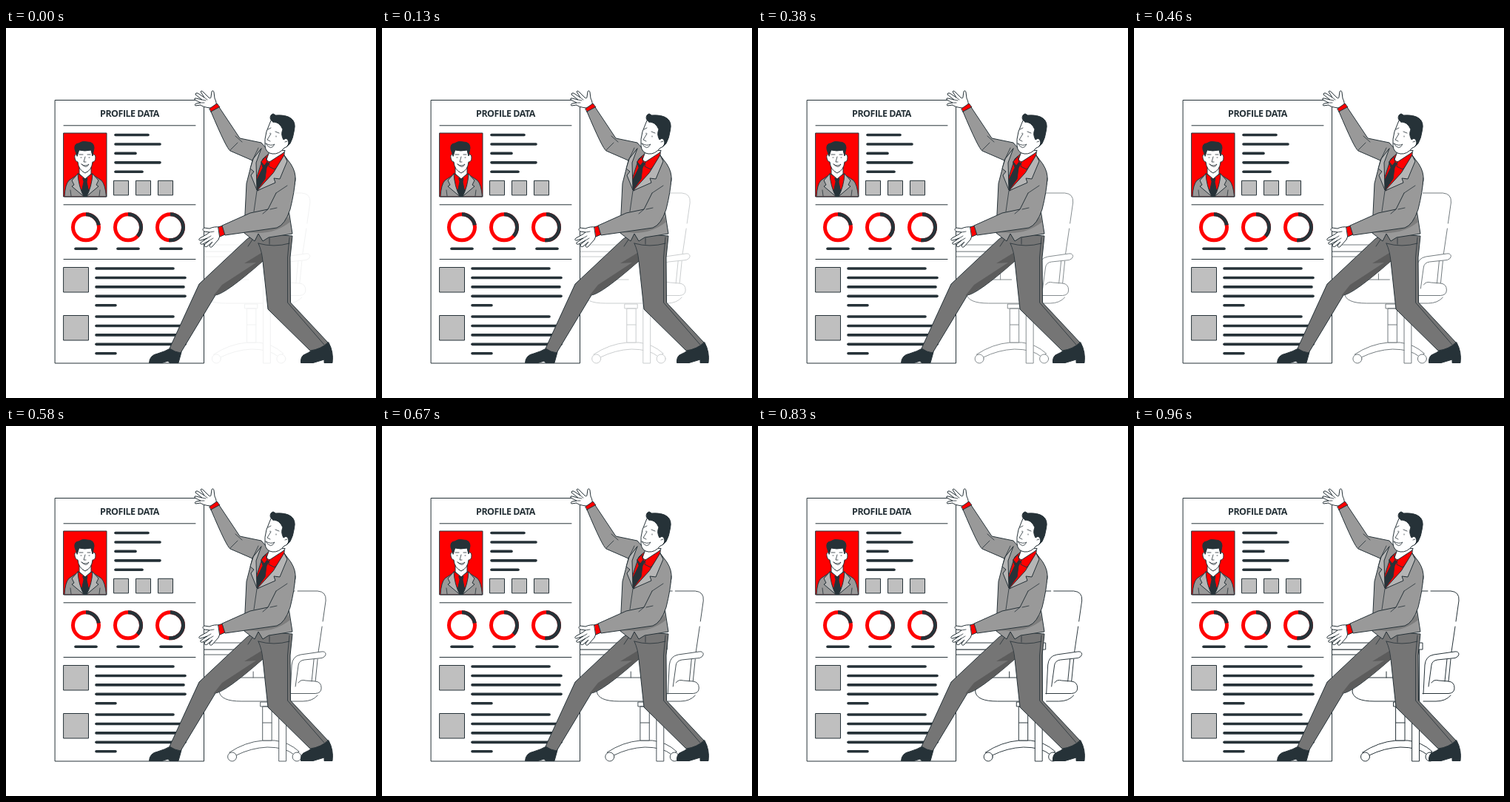
These frames come from a looping animation (500 by 500 pixels, 1.04 s). An HTML page:

```html
<!DOCTYPE html>
<html lang="en">
<head>
<meta charset="utf-8">
<title>Profile data</title>
<style>
html, body { margin: 0; width: 100%; height: 100%; overflow: hidden; background: #fff; }
svg { display: block; width: 100%; height: 100%; stroke-linecap: round; stroke-linejoin: round; }
.ink { fill: none; stroke: #263238; stroke-width: 1; }
.thin { stroke-width: .8; }
.white { fill: #fff; }
.red { fill: #f00; }
.dark { fill: #263238; }
.jacket { fill: #999; }
.lapel { fill: #b5b5b5; }
.legs { fill: #757575; }
.shade { fill: #5c5c5c; stroke: none; }
.tile { fill: #bfbfbf; }
#bars { stroke: #263238; stroke-width: 3.6; }
#rings { fill: none; stroke-width: 5; stroke-linecap: butt; }
#title { font: 700 15px "Open Sans", Roboto, sans-serif; font-stretch: 75%; font-variation-settings: "wdth" 75; letter-spacing: -.04em; text-anchor: middle; fill: #263238; }
</style>
</head>
<body>
<svg viewBox="0 0 500 500">
  <g id="office" class="ink">
    <!-- chair back, armrest and seat -->
    <path d="M380 223H397M401 223H428Q440 224 439 236L435 264M434 271L429 305"/>
    <path class="white" d="M391 362L393 323Q394 311 405 309L433 305Q438.500 304 439 308.500Q438.500 312 434 313.500L410 316Q403 317 402 323L398 352"/>
    <path d="M428 315L425 345M423 315L420 345M402 347Q405 342 412 344L425 345Q433 346 433 354Q433 361 425 361.500H390M391 372H408Q421 372 428 364"/>
    <path d="M312 340H356M341 332V340M305 342Q295 350 295 359Q297 372 325 372H378"/>
    <!-- base and casters -->
    <path class="white" d="M309 441Q330 427 354 425H370Q389 427 403 440L396 444Q384 434 360 434Q338 435 318 445Z"/>
    <path class="white" d="M351 373H368V379H351ZM354 379H366V425H354Z"/>
    <path d="M354 401H366"/>
    <circle class="white" cx="312.500" cy="447" r="6"/>
    <circle class="white" cx="400" cy="447" r="6"/>
    <!-- desk -->
    <path class="white" d="M240 302H376V309H240Z"/>
    <path class="white" d="M376 302H385.500V453H376Z"/>
    <path class="white" d="M240 293H390V302H240Z"/>
  </g>

  <g id="panel" class="ink">
    <path class="white" d="M66.500 97.500H267.500V453H66.500Z"/>
    <path d="M78 131.800H256M78 238.800H256M78 312.500H256"/>
    <g id="tiles"></g>
    <path class="red" d="M78 142H136V228H78Z"/>
    <path class="jacket" d="M79 227.500Q80 211 85 206L97 198H117L129 206Q134 211 135.500 227.500Z"/>
    <path class="red" d="M98 197L107 203L116 197L119 204L109 227.500H105L95 204Z"/>
    <path class="dark" d="M104 203H110L109 208L112 222L109 227.500H105L102 222L105 208Z"/>
    <path class="white" d="M99 187V197L107 204L115 197V187Z"/>
    <path class="lapel" d="M97 197L89 206L92 212L89 214L105 227.500Q98 214 97 197ZM117 197L125 206L122 212L125 214L109 227.500Q116 214 117 197Z"/>
    <path class="thin" d="M87 219L88 227M127 219L126 227"/>
    <path class="white" d="M96 171Q92 170 93 176Q94 181 97 181Q98 192 107 196Q116 192 117 181Q121 181 121 175Q121 170 117 171L115 163H98Z"/>
    <path class="dark" d="M96 173L93 164Q92 156 98 156Q103 152 110 154Q119 154 119 162L117 173L115 165Q106 167 99 165Z"/>
    <path class="thin" d="M99 171H104M110 171H114M101 175H102M112 175H113M107 174L105 181H108M102 184Q107 188 112 184Q109 191 102 184"/>
  </g>
  <text id="title" x="167" y="120.300">PROFILE DATA</text>
  <g id="bars"></g>
  <g id="rings"></g>

  <g id="man" class="ink">
    <!-- legs and shoes -->
    <path class="dark" d="M222 433Q215 437 205 440Q194 442 193.500 452.500H211L219 450L221 452.500H233L237 438Z"/>
    <path class="dark" d="M414 435Q409 439 402 442Q398 445 398.500 452.500H415L430 448V452.500H441Q443 438 436 425Z"/>
    <path class="legs" d="M326 285L261 346L221 433Q228 438 236 439L283 361Q297 359 347 315L354 380L411 436Q426 434 435 425L384.500 371L384 310L387 281L341 277Z"/>
    <path class="shade" d="M345 304L322 318L338 317L292 347L280 362Q302 355 347 315Z"/>
    <path class="thin" d="M383 283L380.500 310V371L430 428M341 291Q346 302 347 315M341 291Q362 297 383 291M333 286L327 295M356 284V292"/>

    <!-- raised hand -->
    <path class="white" d="M276 108Q266 107 263 104L256 105Q254 103 257 102L263 101L255 97Q254 94 257 95L265 97L256 90Q256 87 259 88L268 94L263 86Q264 84 266 86L274 94Q277 96 277 93L278 86Q280 83 281 87L282 95Q285 101 284 104Z"/>
    <path class="thin" d="M263 101L268 101M265 97L270 98M268 94L272 97"/>
    <path class="red" d="M275 109L285 102L289 107L278 114Z"/>

    <!-- lower hand -->
    <path class="white" d="M289 269Q281 268 275 271L268 270Q264 272 268 275L275 276L271 279L262 284Q259 287 263 287L272 284L263 290Q262 293 266 292L275 287L268 293Q268 297 272 295L279 289L275 294Q276 298 279 295L287 286L289 281Z"/>
    <path class="thin" d="M275 276L281 275M272 284L277 281M275 287L280 284"/>
    <path class="red" d="M287 269L293 267L296 279L289 282Z"/>

    <!-- jacket -->
    <path class="jacket" d="M277 113L288 107L316 149L345 155L357 169L376 172L385 184Q392 195 391 206L382 246L387 278L355 283L347 288L341 278L336 288L322 277L323 251L325 210L333 179L303 166Q298 163 277 113Z"/>
    <path class="shade" style="fill:#7d7d7d" d="M324 276L366 270L382 255L384 262Q365 277 341 277Z"/>
    <path class="red" d="M347 177L356 169L376 172L379 178Q360 210 340 220L337 208Z"/>
    <path class="dark" d="M345 181L350 179L355 183L352 189L350 204L340 218L338 207L347 189Z"/>
    <path class="white" d="M357 164L352 178Q357 184 367 180L377 166Z"/>
    <path class="red" d="M351 174L353 181L349 186L345 181ZM376 168L356 181L355 187L363 191L375 178Z"/>
    <path class="lapel" d="M345 163L338 182L339 219L331 199L335 194L330 190L334 177ZM376 172L380 180L370 204L362 203L364 209L339 220L361 196Z"/>
    <path class="jacket" d="M391 203Q390 221 384 245Q377 266 366 270L296 280L292 267L330 250L354 245L365 223"/>
    <path class="thin" d="M365 223L380 213M357 245L366 243M354 245L347 251M339 220L335 248M310 146L319 154M303 165L313 155M333 179L341 162"/>

    <!-- head -->
    <path class="white" d="M358 125L352 140Q349 151 350 159Q351 169 360 170Q369 171 376 162Q383 160 382 153Q380 147 376 150L375 132Z"/>
    <path class="dark" d="M361 127Q355 123 358 118Q361 114 364 118Q378 117 385 122Q392 127 389.500 138Q388 149 384 156L379 161L380 160Q384 154 380 150Q378 148 375 151Q371 144 374 137Q369 126 361 127Z"/>
    <path class="thin" d="M354 137L358 135M364 140L369 142M357 142V143M365 146V147M358 143L353 151L357 153M351 156Q358 160 363 157Q358 167 351 156M377 154L380 153"/>
  </g>
</svg>
<script>
const $ = id => document.getElementById(id);
const square = (x, y, s) => `<rect class="tile" x="${x}" y="${y}" width="${s}" height="${s}"/>`;
const bar = (x, y, end) => `<path d="M${x} ${y}H${end}"/>`;
const stack = (x, y, ends) => ends.map((end, i) => bar(x, y + i * 12.45, end)).join("");

$("tiles").innerHTML = [145.9, 175.9, 205.9].map(x => square(x, 206.3, 19.6)).join("")
  + square(78, 323.5, 33.5) + square(78, 388.5, 33.5);
$("bars").innerHTML = stack(148, 144.5, [192, 208, 175, 208, 184])
  + stack(122, 325, [226, 242, 240, 242, 148])
  + stack(122, 390, [226, 242, 235, 242, 148])
  + [94, 151, 209].map(x => bar(x, 298.3, x + 28)).join("");
$("rings").innerHTML = [80, 133, 186].map((deg, i) => {
  const x = 108 + 57 * i;
  return `<circle cx="${x}" cy="269.300" r="17.5" stroke="#f00"/>
    <circle cx="${x}" cy="269.300" r="17.5" stroke="#263238" pathLength="360"
      stroke-dasharray="${deg} 360" transform="rotate(-90 ${x} 269.300)"/>`;
}).join("");

// Pick the font size that suits the heading space.
const title = $("title");
title.style.fontSize = Math.min(19, 15 * 80 / title.getComputedTextLength()) + "px";

// Furniture glides in from the left at 24 steps per second, then rests.
const LOOP = 1040, STEPS = 24;
const start = performance.now();
function draw() {
  const t = (performance.now() - start) % LOOP;
  const step = Math.min(STEPS, Math.floor((t + 4) * STEPS / 1000) + 1);
  const rest = (1 - step / STEPS) ** 1.5;
  $("office").setAttribute("transform", `translate(${-30 * rest} 0)`);
  $("office").setAttribute("opacity", 1 - rest);
  requestAnimationFrame(draw);
}
draw();
</script>
</body>
</html>
```
